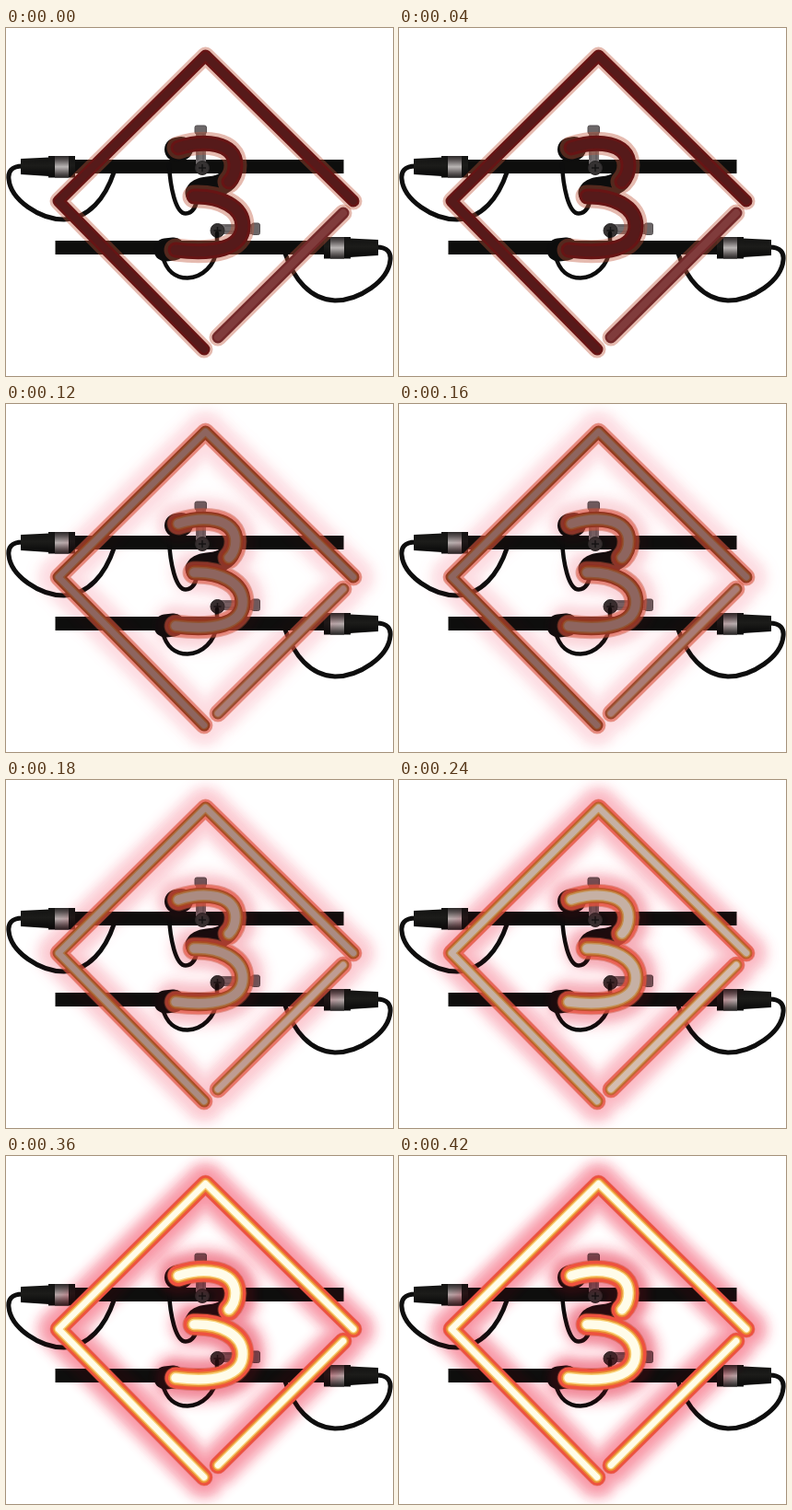
Write an HTML page that moves like this. It is 420 px wide and 378 px high and loops after 0.46 s.

```html
<!DOCTYPE html>
<html lang="en">
<head>
<meta charset="utf-8">
<title>Neon sign</title>
<style>
  html, body { margin: 0; width: 100%; height: 100%; overflow: hidden; background: #fff; }
  svg { display: block; width: 100vw; height: 100vh; }
  .line { fill: none; stroke-linecap: round; stroke-linejoin: round; }
  #glow { mix-blend-mode: multiply; }
</style>
</head>
<body>
<svg viewBox="0 0 420 378">
  <defs>
    <linearGradient id="steel" x2="0" y2="1">
      <stop offset="0" stop-color="#2b2828"/>
      <stop offset=".2" stop-color="#5c5757"/>
      <stop offset=".5" stop-color="#b9b5b4"/>
      <stop offset=".8" stop-color="#5c5757"/>
      <stop offset="1" stop-color="#252323"/>
    </linearGradient>
    <linearGradient id="plastic" x2="0" y2="1">
      <stop offset="0" stop-color="#131312"/>
      <stop offset=".45" stop-color="#1c1c1a"/>
      <stop offset="1" stop-color="#080808"/>
    </linearGradient>
    <filter id="soft" filterUnits="userSpaceOnUse" x="-30" y="-30" width="480" height="438">
      <feGaussianBlur stdDeviation="4"/>
    </filter>

    <path id="corner" d="M377 188 L216.500 30 L57 188 L215 349"/>
    <path id="side" d="M366 201 L230 336"/>
    <g id="diamond"><use href="#corner"/><use href="#side"/></g>
    <path id="digit" d="M187 130 C215 121 249 124 249 149 C249 157 247 162 242 167
      M204 183 C232 182 257 194 257 215 C257 240 225 246 184 241"/>

    <g id="rod">
      <path class="line" stroke="#0e0e0e" stroke-width="5"
        d="M18 150 C6 150 2 156 3 164 C5 187 37 208 63 208 C90 207 108 184 117 157"/>
      <rect x="68" y="143" width="298.500" height="15" fill="#0e0e0d"/>
      <path d="M16 142 L47 140.500 V161 L16 159 Z" fill="url(#plastic)"/>
      <rect x="46" y="139" width="29" height="23.500" fill="url(#plastic)"/>
      <rect x="53" y="139" width="15" height="23.500" fill="url(#steel)"/>
    </g>

    <g id="clip">
      <rect x="-7" y="-40" width="11" height="38" fill="#746f70"/>
      <path d="M-5 -37 V-8 M1 -37 V-8" stroke="#595456"/>
      <rect x="-8" y="-46" width="12.500" height="9" rx="2" fill="#6c6768" stroke="#555152"/>
      <circle r="7.500" fill="#353232" stroke="#292727"/>
      <path d="M-4 0 H4 M0 -4 V4" stroke="#151414" stroke-width="1.500"/>
    </g>
  </defs>

  <use href="#rod"/>
  <use href="#rod" transform="translate(420 88) scale(-1 1)"/>
  <use href="#clip" transform="translate(213 152)"/>
  <use href="#clip" transform="translate(229.500 220) rotate(90)"/>
  <g class="line" stroke="#0d0d0d">
    <path stroke-width="4.500" d="M177 148 C178 172 184 201.500 195 201.500 C203 201.500 206 194 208 185"/>
    <path stroke-width="4.500" d="M170 248 C174 264 184 271.500 197 271.500 C213 271 227 258 229 239 V223"/>
    <path stroke-width="26" d="M185 132 L190 131"/>
    <path stroke-width="23" d="M241 164 C232 177 211 169 206 179"/>
    <path stroke-width="25" d="M173 241 L182 240"/>
  </g>

  <g id="glow"></g>
  <g id="haze"></g>
  <g id="unlit"></g>
  <g id="lit"></g>
</svg>
<script>
  const STEP = 60, STEPS = 6, LOOP = 460;
  const layer = id => document.getElementById(id);

  function stroke(parent, shape, color, width, opacity = 1, filter = "") {
    const use = document.createElementNS("http://www.w3.org/2000/svg", "use");
    const attrs = { href: "#" + shape, class: "line", stroke: color, "stroke-width": width, opacity };
    if (filter) attrs.filter = `url(#${filter})`;
    for (const name in attrs) use.setAttribute(name, attrs[name]);
    layer(parent).append(use);
  }

  for (const [shape, widths] of [["diamond", [58, 42, 28]], ["digit", [64, 46, 34]]]) {
    [.12, .18, .2].forEach((opacity, i) =>
      stroke("glow", shape, "#ff2848", widths[i], opacity, "soft"));
  }
  stroke("haze", "diamond", "#b0142c", 44, .08, "soft");
  stroke("haze", "digit", "#b0142c", 44, .16, "soft");

  function unlit(shape, widths, rim, core) {
    stroke("unlit", shape, "#bd5438", widths[0], .4);
    stroke("unlit", shape, rim, widths[1]);
    stroke("unlit", shape, core, widths[2]);
  }
  unlit("corner", [19, 13, 8], "#671414", "#561a1a");
  unlit("side", [19, 13, 8], "#73292a", "#803c3c");
  unlit("digit", [25, 17, 11], "#671414", "#561a1a");

  for (const [shape, widths] of [["diamond", [18, 12.5, 9, 6.5]], ["digit", [23, 16, 12.5, 9.5]]]) {
    ["#ee513f", "#e98a32", "#f8cf72", "#fffce9"].forEach((color, i) =>
      stroke("lit", shape, color, widths[i]));
  }

  // The tube warms up in even steps, then cuts back to dark.
  function draw(time) {
    const power = Math.min(STEPS, Math.floor(time % LOOP / STEP)) / STEPS;
    for (const id of ["glow", "haze", "lit"]) layer(id).setAttribute("opacity", power);
  }

  const start = performance.now();
  function tick() {
    draw(performance.now() - start);
    requestAnimationFrame(tick);
  }
  draw(0);
  requestAnimationFrame(tick);
</script>
</body>
</html>
```
